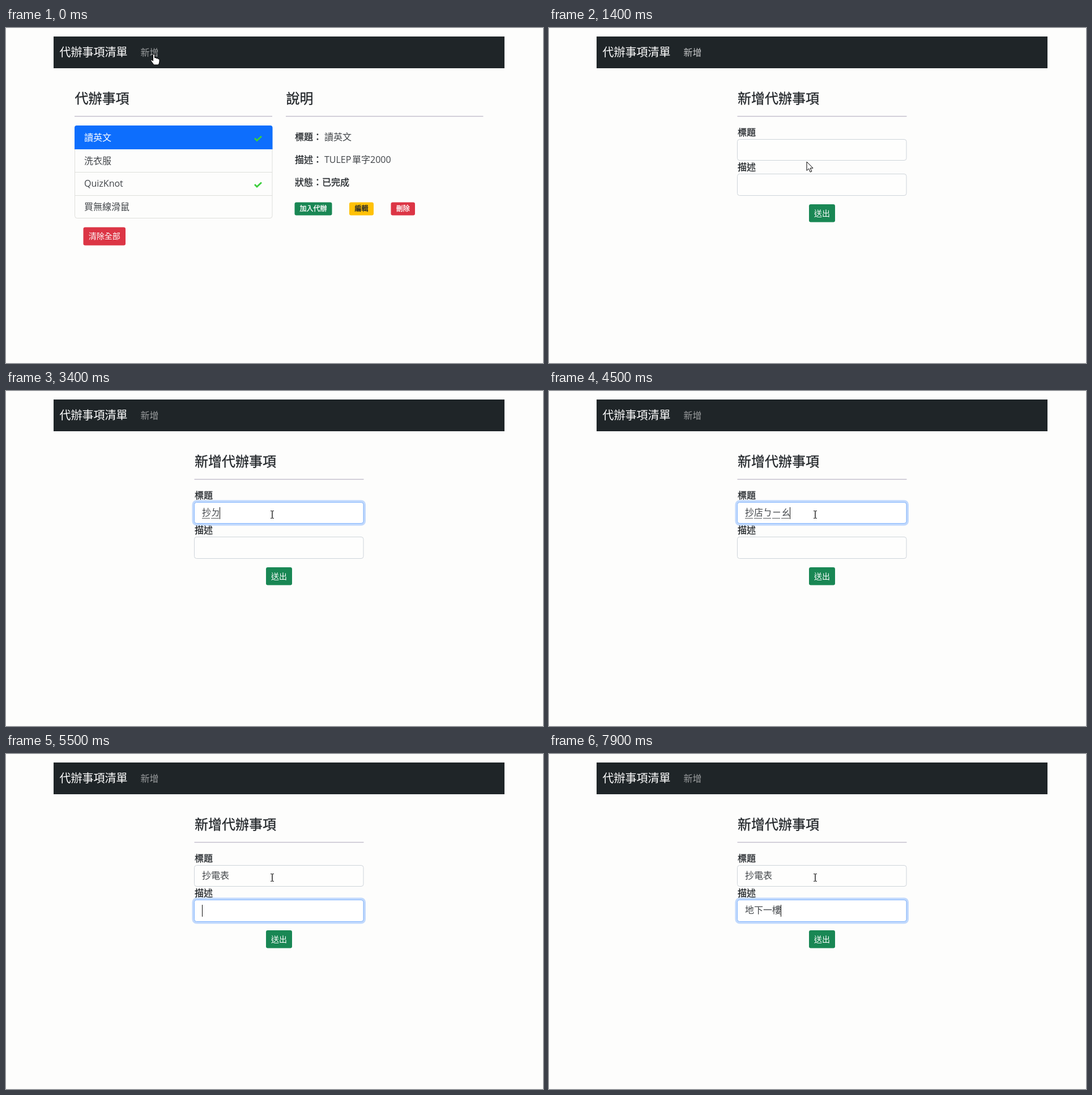
Write an HTML page that moves like this. It is 948 by 591 pixels and loops after 8000 ms.

```html
<!DOCTYPE html>
<html lang="zh-Hant">
<head>
<meta charset="utf-8">
<title>代辦事項清單</title>
<style>
  html, body { margin: 0; width: 100%; height: 100%; overflow: hidden; background: #fdfdfc; }
  svg { display: block; width: 948px; height: 591px; }
  text {
    font: 400 16px "Open Sans", "Noto Sans CJK TC", "Noto Sans CJK JP", sans-serif;
    fill: #404448;
    white-space: pre;
  }
  .brand { font-size: 20px; fill: #fff; }
  .title, .label { fill: #212529; stroke: #212529; stroke-width: .3; }
  .title { font-size: 24px; }
  .btn { font-size: 14px; fill: #fff; text-anchor: middle; }
  .small { font-size: 12px; stroke: #fff; stroke-width: .35; }
  .dark { fill: #212529; stroke: #212529; }
  .light { fill: #fff; }
  .rule { fill: #c6c1cf; }
  .green { fill: #198754; }
  .red { fill: #dc3545; }
  .yellow { fill: #ffc107; }
  .frame { fill: none; stroke: #dedfdb; }
  .check { fill: none; stroke: #3ccf3c; stroke-width: 2.8; }
  .box { fill: #fff; fill-opacity: .3; stroke: #ced4da; }
  .glow { fill: none; stroke: #0d6efd; stroke-opacity: .25; stroke-width: 4; }
  .lit { fill: #fff; stroke: #86b7fe; }
  .compose { stroke: #212529; stroke-opacity: .75; stroke-dasharray: 14 2; }
  .caret { fill: #111; }
  .pointer { fill: #fff; stroke: #000; }
  .ibeam { fill: none; stroke: #222; }
</style>
</head>
<body>
<svg viewBox="0 0 948 591">
  <rect x="84" y="15" width="796" height="56" fill="#1f2528"/>
  <text class="brand" x="94.5" y="50">代辦事項清單</text>
  <text id="link" class="light" x="237.5" y="48.5">新增</text>

  <g id="list">
    <text class="title" x="121.5" y="132.5">代辦事項</text>
    <rect class="rule" x="121" y="155" width="349" height="1.5"/>
    <rect class="frame" x="121.5" y="172.5" width="348.5" height="163" rx="4"/>
    <path class="frame" d="M122 254.5h348M122 295.5h348"/>
    <path fill="#0d6efd" d="M121 214v-38q0-4 4-4h341.5q4 0 4 4v38z"/>
    <text class="light" x="138" y="198.5">讀英文</text>
    <text x="138" y="239.5">洗衣服</text>
    <text x="138" y="280">QuizKnot</text>
    <text x="138" y="320.5">買無線滑鼠</text>
    <path class="check" d="M439 194.5l4 4 8-7.5M439 276l4 4 8-7.5"/>
    <rect class="red" x="136.5" y="351.5" width="74.5" height="32" rx="3.2"/>
    <text class="btn" x="173.7" y="372">清除全部</text>

    <text class="title" x="494.5" y="132.5">說明</text>
    <rect class="rule" x="494" y="155" width="348.5" height="1.5"/>
    <text class="label" x="510" y="197.5">標題：</text>
    <text x="562" y="197.5">讀英文</text>
    <text class="label" x="510" y="237.5">描述：</text>
    <text x="562" y="237.5">TULEP<tspan x="611">單字2000</tspan></text>
    <text class="label" x="510" y="277.5">狀態：已完成</text>
    <rect class="green" x="509.5" y="307.5" width="66" height="23" rx="3.2"/>
    <text class="btn small" x="542.5" y="323">加入代辦</text>
    <rect class="yellow" x="606" y="307.5" width="43" height="23" rx="3.2"/>
    <text class="btn small dark" x="627.5" y="323">編輯</text>
    <rect class="red" x="679.5" y="307.5" width="42.5" height="23" rx="3.2"/>
    <text class="btn small" x="700.7" y="323">刪除</text>
  </g>

  <g id="form">
    <text class="title" x="333" y="132.5">新增代辦事項</text>
    <rect class="rule" x="332.5" y="155" width="299" height="1.5"/>
    <text class="label" x="333" y="189.5">標題</text>
    <text class="label" x="333" y="250.5">描述</text>
    <g id="fields"></g>
    <rect class="green" x="459" y="311" width="46" height="31.5" rx="3.2"/>
    <text class="btn" x="482" y="331.7">送出</text>
  </g>

  <g id="cursor">
    <path id="hand" class="pointer" d="M-1.5 1.5q0-1.5 1.5-1.5t1.5 1.5v5q3-.6 3 1 3-.6 3 1 2.5-.3 2.5 1.5v3q0 3-2 6h-8l-5-7q-1-2 1-2l2.5 2z"/>
    <path id="arrow" class="pointer" d="M0 0v15.5l3.6-3.4 2.6 6 2.6-1.1-2.6-5.8h4.8z"/>
    <path id="ibeam" class="ibeam" d="M-3-6.5h2.2q.8 0 .8.8v11.4q0 .8-.8.8H-3M3-6.5H.8q-.8 0-.8.8v11.4q0 .8.8.8H3"/>
  </g>
</svg>
<script>
const LOOP = 8000, PAGE = 250, FADE = 150;
const $ = id => document.getElementById(id);
const clamp = v => Math.max(0, Math.min(1, v));
const ramp = (t, from) => clamp((t - from) / FADE);
const show = (el, on) => el.setAttribute('visibility', on ? 'inherit' : 'hidden');

// Each field: focus period, typing start and pace, moment the text is committed.
const fields = [
  { top: 196.5, height: 37, focus: 1650, blur: 5320, start: 2650, pace: 195, commit: 5000,
    steps: 'ㄔ ㄔㄠ 抄 抄ㄉ 抄ㄉㄧ 抄ㄉㄧㄢ 抄店 抄店ㄅ 抄店ㄅㄧ 抄店ㄅㄧㄠ 抄電表'.split(' ') },
  { top: 257.5, height: 38, focus: 5320, blur: Infinity, start: 5850, pace: 140, commit: 7700,
    steps: 'ㄉ ㄉㄧ 地 地ㄒ 地ㄒㄧ 地ㄒㄧㄚ 地下 地下ㄧ 地下一 地下一ㄌ 地下一ㄌㄡ 地下一樓'.split(' ') }
];

for (const f of fields) {
  const g = document.createElementNS('http://www.w3.org/2000/svg', 'g');
  const rect = (cls, pad = 0) => `<rect class="${cls}" x="${332.5 - pad}" y="${f.top - pad}"
    width="${298.5 + 2 * pad}" height="${f.height + 2 * pad}" rx="${4 + pad}"/>`;
  g.innerHTML = `${rect('box')}<g>${rect('glow', 2)}${rect('lit')}</g>
    <text x="346" y="${f.top + 23.5}"></text><path class="compose"/>
    <rect class="caret" y="${f.top + 8.5}" width="1" height="21"/>`;
  $('fields').append(g);
  [f.halo, f.text, f.line, f.caret] = [...g.children].slice(1);
}

function drawField(f, t) {
  const last = f.steps.length - 1;
  const i = Math.min(last, Math.floor((t - f.start) / f.pace));
  const value = i < 0 ? '' : f.steps[i];
  const end = 346 + 16 * value.length;
  const reset = i < 0 ? f.focus : t >= f.commit ? f.commit : f.start + i * f.pace;
  const focused = t >= f.focus && t < f.blur;
  f.halo.setAttribute('opacity', ramp(t, f.focus) - ramp(t, f.blur));
  f.text.textContent = value;
  f.line.setAttribute('d', `M346 ${f.top + 28}H${end}`);
  show(f.line, value && t < f.commit);
  f.caret.setAttribute('x', end - (value ? 1 : 0));
  show(f.caret, focused && (t - reset) % 1000 < 500);
}

// Time, x, y of the pointer's path.
const path = [[0, 261, 46], [950, 261, 46], [1400, 454.5, 236.5], [1600, 470, 218], [LOOP, 470, 218]];

function drawCursor(t) {
  const n = path.findIndex(p => p[0] > t);
  const [a, b] = [path[n - 1], path[n]];
  const k = clamp((t - a[0]) / (b[0] - a[0]));
  const e = k * k * (3 - 2 * k);
  const x = a[1] + (b[1] - a[1]) * e, y = a[2] + (b[2] - a[2]) * e;
  const onLink = x < 277 && y < 63;
  const onField = x > 332 && fields.some(f => y > f.top && y < f.top + f.height);
  $('cursor').setAttribute('transform', `translate(${Math.round(x)} ${Math.round(y)})`);
  show($('hand'), onLink);
  show($('ibeam'), onField);
  show($('arrow'), !onLink && !onField);
}

function draw(now) {
  const t = now % LOOP;
  show($('list'), t < PAGE);
  show($('form'), t >= PAGE);
  $('link').setAttribute('fill-opacity', .55 + .2 * (ramp(t, 0) - ramp(t, fields[0].focus)));
  fields.forEach(f => drawField(f, t));
  drawCursor(t);
}

const begin = performance.now();
function tick() {
  draw(performance.now() - begin);
  requestAnimationFrame(tick);
}
tick();
</script>
</body>
</html>
```
